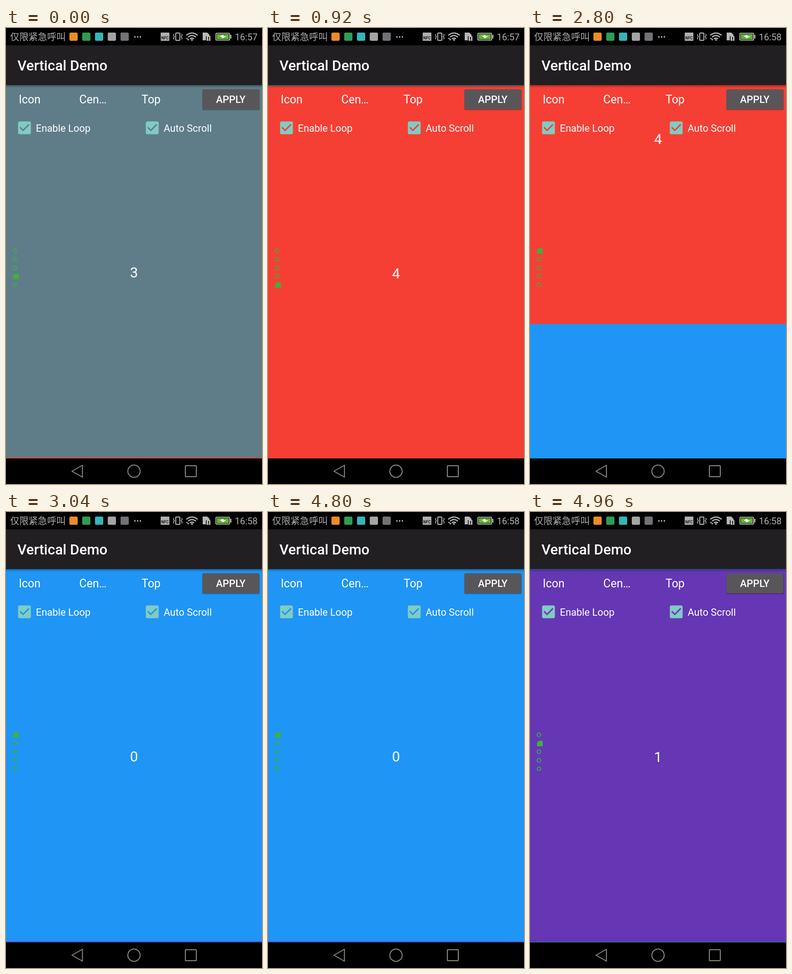
These frames come from a looping animation (561 px wide and 998 px high, 5040 ms). An HTML page:

```html
<!DOCTYPE html>
<html lang="en">
<head>
<meta charset="utf-8">
<title>Vertical Demo</title>
<style>
  html, body { margin: 0; width: 100%; height: 100%; overflow: hidden; background: #000; }
  svg { display: block; width: 100vw; height: 100vh; font-family: Roboto, sans-serif; fill: #fff; }
  .status { fill: #b0b0b0; font-size: 20px; }
  .line { fill: none; stroke: #b8b8b8; stroke-width: 2; }
  .nav { fill: none; stroke: #8c8c8c; stroke-width: 2; stroke-linejoin: round; }
  .label { font-size: 21.8px; }
  .option { font-size: 24.9px; }
  .number { font-size: 31.2px; text-anchor: middle; }
  .ring { fill: none; stroke: #3eb13c; stroke-width: 1.8; }
</style>
</head>
<body>
<svg viewBox="0 0 561 998">
  <defs>
    <clipPath id="pager"><rect y="125" width="561" height="817"/></clipPath>
    <linearGradient id="shade" x2="0" y2="1">
      <stop stop-opacity=".3"/><stop offset="1" stop-opacity="0"/>
    </linearGradient>
    <path id="check" fill="#80cbc4" d="M19 3H5c-1.1 0-2 .9-2 2v14c0 1.1.9 2 2 2h14c1.1 0 2-.9 2-2V5c0-1.1-.9-2-2-2zm-9 14l-5-5 1.4-1.4L10 14.2l7.6-7.6L19 8l-9 9z"/>
  </defs>
  <rect width="561" height="998" fill="#000"/>
  <g clip-path="url(#pager)"><g id="pages"></g></g>
  <rect y="125" width="561" height="6" fill="url(#shade)"/>
  <g id="dots"></g>
  <path id="selected" fill="#3eb13c" d="M19.5 -6H26.5Q28 -6 28 -4.500V4.500Q28 6 26.500 6H17Q15.500 6 15.500 4.500V-2Z"/>

  <rect y="38" width="561" height="87" fill="#221f23"/>
  <text x="25" y="93" font-size="31.2" font-weight="500">Vertical Demo</text>

  <g class="option">
    <text x="28" y="165">Icon</text>
    <text x="160.500" y="165">Cen…</text>
    <text x="297" y="165">Top</text>
  </g>
  <rect x="430" y="135" width="126" height="45" rx="3" fill-opacity=".25" fill="#000"/>
  <rect x="430.500" y="134" width="124.500" height="44" rx="3" fill="#595659"/>
  <text class="label" x="492.500" y="164" font-weight="500" text-anchor="middle">APPLY</text>
  <use href="#check" transform="translate(21.800 199.800) scale(1.558)"/>
  <use href="#check" transform="translate(301.800 199.800) scale(1.558)"/>
  <text class="label" x="65.500" y="226.500">Enable Loop</text>
  <text class="label" x="345.500" y="226.500">Auto Scroll</text>

  <g class="status">
    <text x="9" y="27" font-size="20.3" style="font-family: 'Noto Sans CJK SC', 'Noto Sans CJK', sans-serif">仅限紧急呼叫</text>
    <text id="clock" x="501.500" y="27"></text>
    <g id="apps"></g>
    <path d="M281 18h3v3h-3zm6 0h3v3h-3zm6 0h3v3h-3z"/>
    <rect x="339" y="10" width="19" height="18" rx="1"/>
    <text x="348.500" y="24.500" font-size="14" font-weight="500" text-anchor="middle" textLength="auto" style="fill: #000; font-size: 8.500px">NFC</text>
  </g>
  <g class="line">
    <rect x="372" y="11" width="9" height="16" rx="1"/>
    <path d="M368 13l-1 3 2 3-2 3 1 3M385 13l1 3-2 3 2 3-1 3" stroke-width="1.600"/>
    <path d="M395 16q12.500-10 25 0M399 20q8.500-7 17 0M403 24q4.500-4 9 0" stroke-width="2.400"/>
    <rect x="460" y="11.500" width="30" height="15" rx="1.500"/>
  </g>
  <g fill="#b8b8b8">
    <circle cx="407.500" cy="26" r="2"/>
    <path d="M394 24l2.500-3 2.500 3zM397 24l2.500 4 2-4z"/>
    <path d="M431 10h10l5 5v3h-8v9h-7zM439.500 18h8.500v10h-8.500z"/>
    <path d="M443 20h2v4h-2zm0 5h2v2h-2z" fill="#000"/>
    <rect x="491.500" y="15" width="2.500" height="8"/>
  </g>
  <rect x="462" y="13.500" width="26" height="11" fill="#5fb82c"/>
  <path d="M468 18l8-3 1 3h6l-9 5-1-3z"/>

  <g class="nav">
    <path d="M144.500 970L167.500 957V983Z"/>
    <circle cx="280.500" cy="970" r="13.500"/>
    <rect x="393" y="958" width="24" height="24" rx="1"/>
  </g>
</svg>
<script>
const LOOP = 5040, STEP = 40, SCROLL = 200, PAGE = 815, FIRST = 3;
const scrollStarts = [779, 2783, 4816];
const colors = ['#1f95f5', '#6537b5', '#009688', '#5e7d89', '#f53f34'];
const appColors = ['#ee8b25', '#2d9d55', '#35b5b8', '#a4a4a4', '#707276'];
const $ = id => document.getElementById(id);
const dotY = i => 487.5 + 18.65 * i;

// Pages are stacked in the order they come into view.
$('pages').innerHTML = colors.map((_, i) => {
  const page = (FIRST + i) % colors.length;
  return `<g transform="translate(0 ${i * PAGE})">
    <rect y="125" width="561" height="${PAGE}" fill="${colors[page]}"/>
    <text class="number" x="280.5" y="546">${page}</text></g>`;
}).join('');
$('dots').innerHTML = colors.map((_, i) =>
  `<circle class="ring" cx="19.500" cy="${dotY(i)}" r="4"/>`).join('');
$('apps').innerHTML = appColors.map((color, i) =>
  `<rect x="${139 + 28 * i}" y="10" width="18" height="18" rx="3" fill="${color}"/>`).join('');

function easeOutQuint(x) {
  return 1 - (1 - Math.min(1, Math.max(0, x))) ** 5;
}

function draw(now) {
  const time = Math.floor(now % LOOP / STEP) * STEP;
  const position = scrollStarts.reduce((sum, start) => sum + easeOutQuint((time - start) / SCROLL), 0);
  const selected = (FIRST + scrollStarts.filter(start => time >= start).length) % colors.length;
  $('pages').setAttribute('transform', `translate(0 ${-Math.round(position * PAGE)})`);
  $('selected').setAttribute('transform', `translate(0 ${dotY(selected) + 0.5})`);
  [...$('dots').children].forEach((dot, i) => dot.style.display = i === selected ? 'none' : '');
  $('clock').textContent = time < 1840 ? '16:57' : '16:58';
}

let begin;
function tick(now) {
  begin ??= now;
  draw(now - begin);
  requestAnimationFrame(tick);
}
draw(0);
requestAnimationFrame(tick);
</script>
</body>
</html>
```
